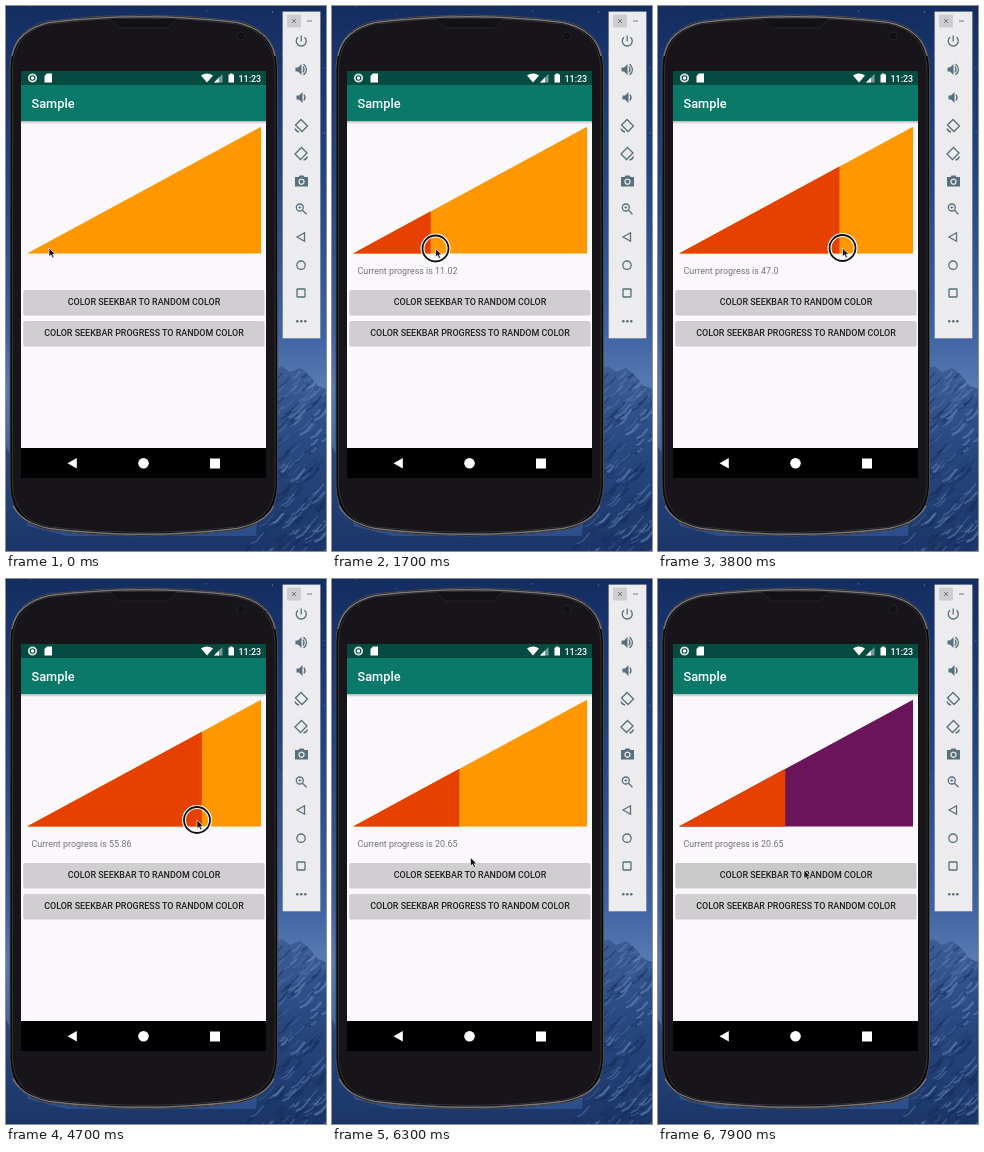
Recreate the animation shown at these times as an HTML page. Size 320x545 px, loop 8000 ms.

```html
<!DOCTYPE html>
<html lang="en">
<head>
<meta charset="utf-8">
<title>Triangle seekbar</title>
<style>
html, body { margin: 0; width: 100%; height: 100%; overflow: hidden; background: #14264e; }
svg { display: block; width: 320px; height: 545px; font-family: Roboto, sans-serif; font-size: 8.93px; }
.caps { font-weight: 500; text-anchor: middle; fill: #202020; }
.tools { fill: none; stroke: #596f7b; stroke-width: 1.3; }
.solid { fill: #596f7b; stroke: none; }
</style>
</head>
<body>
<svg viewBox="0 0 320 545">
  <defs>
    <linearGradient id="sky" x2="0" y2="1">
      <stop offset="0" stop-color="#142d61"/>
      <stop offset=".3" stop-color="#204481"/>
      <stop offset=".6" stop-color="#3e63a2"/>
      <stop offset=".7" stop-color="#587bb2"/>
      <stop offset="1" stop-color="#274987"/>
    </linearGradient>
    <linearGradient id="rock" x2="0" y2="1">
      <stop offset="0" stop-color="#3c5d96"/>
      <stop offset=".4" stop-color="#2a4a83"/>
      <stop offset="1" stop-color="#1b3567"/>
    </linearGradient>
    <linearGradient id="shade" x2="0" y2="1">
      <stop offset="0" stop-color="#000" stop-opacity=".28"/>
      <stop offset="1" stop-color="#000" stop-opacity="0"/>
    </linearGradient>
    <clipPath id="ridge">
      <path d="M0 440L6 452L22 520L60 530H250L262 366L276 360L284 366L294 362L304 370L312 380L320 383V545H0Z"/>
    </clipPath>
  </defs>

  <!-- Desktop -->
  <rect width="320" height="545" fill="url(#sky)"/>
  <g id="stars" fill="#a9c0e8"></g>
  <g clip-path="url(#ridge)">
    <rect y="360" width="320" height="185" fill="url(#rock)"/>
    <g id="streaks" fill="none" stroke-linecap="round"></g>
  </g>

  <!-- Phone -->
  <path d="M4 62Q5 23 42 15Q137 3 232 15Q270 23 271.500 62V480Q270 517 232 524Q137 536 42 524Q5 517 4 480Z" fill="#09090a" stroke="#4b4b50"/>
  <path d="M6.500 62Q8 26 43 18Q137 6 231 18Q267 26 269 62V480Q267 514 231 521Q137 532 43 521Q8 514 6.500 480Z" fill="#171519" stroke="#3c3b40" stroke-width=".8"/>
  <path d="M6 50Q11 24 43 16.500Q137 5 231 16.500Q264 24 269 50M7 500Q16 517 43 522.500Q137 534 231 522.500Q259 517 268 500" fill="none" stroke="#77767b" stroke-width="1.300"/>
  <path d="M104 13L113 22H162L171 13" fill="#121114" stroke="#29282c" stroke-width=".8"/>
  <circle cx="235" cy="30" r="4" fill="#111014" stroke="#222126"/>

  <!-- Screen -->
  <rect x="15" y="65" width="245" height="407" fill="#faf8fb"/>
  <rect x="15" y="65" width="245" height="14" fill="#064b42"/>
  <rect x="15" y="79" width="245" height="36" fill="#0a7969"/>
  <rect x="15" y="115" width="245" height="3" fill="url(#shade)"/>
  <rect x="15" y="442" width="245" height="30"/>
  <g fill="#fff">
    <circle cx="26.500" cy="72" r="3.700" fill="none" stroke="#d5e2df" stroke-width="1.800"/>
    <circle cx="26.500" cy="72" r="1.700"/>
    <path d="M38.500 70L41 67.500H46V76.500H38.500ZM195 69.500Q201 65.500 207 69.500L201 76.500ZM222.500 68.500H224V67.500H226.500V68.500H228V76.500H222.500Z"/>
    <path d="M208 76.500L216.500 68V76.500Z" opacity=".45"/>
    <path d="M208 76.500L213 71.500V76.500Z"/>
    <text x="232.500" y="75.500" font-weight="500">11:23</text>
    <text x="25.500" y="102.300" font-size="12.76" font-weight="500">Sample</text>
    <path d="M61.500 457.300L70.800 452V462.600Z"/>
    <circle cx="137.500" cy="457.300" r="5.300"/>
    <rect x="204" y="452.500" width="10" height="10"/>
  </g>

  <path id="track"/>
  <path id="fill" fill="#e64100"/>
  <text id="label" x="25.500" y="268" fill="#747275"></text>

  <g id="buttons"></g>
  <text class="caps" x="138" y="299.300">COLOR SEEKBAR TO RANDOM COLOR</text>
  <text class="caps" x="138" y="330">COLOR SEEKBAR PROGRESS TO RANDOM COLOR</text>

  <!-- Emulator toolbar -->
  <rect x="276.750" y="5.750" width="37.500" height="326.500" fill="#ececee" stroke="#8b93a3" stroke-width=".5"/>
  <rect x="281" y="8.500" width="14" height="13" rx="1" fill="#cdcdcf"/>
  <path d="M286 13L290 17M290 13L286 17M301 15H306" fill="none" stroke="#777b80"/>
  <g class="tools">
    <path d="M292 31.200A5 5 0 1 0 298.500 31.200M295.200 29.500V35.500"/>
    <path class="solid" d="M289.500 61.500H292L295.500 58V69L292 65.500H289.500ZM290.500 89.500H293L296.500 86V97L293 93.500H290.500Z"/>
    <path d="M297 60.500Q299 63.500 297 66.500M297.500 58Q303.500 63.500 297.500 69M298 88.500Q300 91.500 298 94.500"/>
    <g id="turn">
      <path d="M289.500 119L295 113.500L301.500 120L296 125.500ZM289 122.500Q290 125.500 293 126"/>
    </g>
    <use href="#turn" transform="matrix(-1 0 0 1 590.500 28)"/>
    <path class="solid" fill-rule="evenodd" d="M289 171H292.500L293.500 169.500H297.500L298.500 171H302V180.500H289ZM295.500 172.500A3.200 3.200 0 1 0 295.510 172.500Z"/>
    <circle class="solid" cx="295.500" cy="175.700" r="1.900"/>
    <circle cx="293.800" cy="201.500" r="3.500"/>
    <path d="M296.500 204.300L300.500 208.300"/>
    <path d="M292.200 201.500H295.400M293.800 199.900V203.100" stroke-width=".8"/>
    <path d="M291 231L298.500 226.800V235.200Z"/>
    <circle cx="295" cy="259.200" r="4.200"/>
    <rect x="291" y="283" width="8" height="8" rx=".5"/>
    <g class="solid">
      <circle cx="291.300" cy="315.200" r="1.300"/>
      <circle cx="295.300" cy="315.200" r="1.300"/>
      <circle cx="299.300" cy="315.200" r="1.300"/>
    </g>
  </g>

  <g id="pointer">
    <g id="ring" fill="none">
      <circle r="13" stroke="#fff" stroke-width="4"/>
      <circle r="13" stroke="#111" stroke-width="1.800"/>
    </g>
    <path d="M0 0V8.500L2 6.800L3.500 10L5 9.300L3.600 6.300H6.200Z" fill="#111" stroke="#fff" stroke-width=".6"/>
  </g>
</svg>
<script>
const LOOP = 8000, STEP = 100;
const LEFT = 21, WIDTH = 234, BASE = 247.4, HEIGHT = 126.6;
const PRESS = 7200, RELEASE = 7500;
const $ = id => document.getElementById(id);

// Rows of time, x, y
const pointerPath = [
  [0, 43, 242], [300, 43, 242], [1000, 72, 242], [1700, 103.5, 242.5], [3000, 154.5, 244.5],
  [3800, 184.5, 242], [4300, 200, 241.5], [4700, 191, 241], [5300, 152, 243],
  [5700, 128, 245], [5900, 128, 247], [6300, 138.5, 278.5], [6700, 146, 291], [8000, 146, 291]
];
// Rows of time and share of the width; progress is the share of the area
const sharePath = [
  [400, .9], [1700, 11.02], [3000, 31.06], [3800, 47], [4400, 58.2],
  [4700, 55.86], [5300, 33.5], [5700, 20.65], [8000, 20.65]
].map(([t, progress]) => [t, Math.sqrt(progress / 100)]);

function sample(path, t) {
  const i = path.findIndex(key => key[0] > t);
  if (i < 1) return path[i < 0 ? path.length - 1 : 0].slice(1);
  const a = path[i - 1], b = path[i], k = (t - a[0]) / (b[0] - a[0]);
  return a.slice(1).map((v, n) => v + (b[n + 1] - v) * k);
}

const within = (t, from, to) => t >= from && t < to;

const wedge = share =>
  `M${LEFT} ${BASE}L${LEFT + WIDTH * share} ${BASE - HEIGHT * share}V${BASE}Z`;

function formatNumber(v) {
  const s = String(Math.round(v * 100) / 100);
  return s.includes('.') ? s : s + '.0';
}

function draw(now) {
  const t = Math.floor(now % LOOP / STEP) * STEP;
  const [x, y] = sample(pointerPath, t);
  const pressed = within(t, PRESS, RELEASE);
  $('pointer').setAttribute('transform', `translate(${x} ${y})`);
  $('ring').style.display = pressed || within(t, 300, 5900) ? '' : 'none';

  const share = t < 400 ? 0 : sample(sharePath, t)[0];
  $('fill').setAttribute('d', wedge(share));
  $('label').textContent = share ? 'Current progress is ' + formatNumber(share * share * 100) : '';
  $('track').setAttribute('fill', t < RELEASE ? '#ff9800' : '#6a1459');
  $('face0').setAttribute('fill', pressed ? '#c2c0c2' : t >= RELEASE ? '#cac9ca' : '#d0ced0');
  requestAnimationFrame(draw);
}

$('track').setAttribute('d', wedge(1));
$('buttons').innerHTML = [284, 315].map((y, i) =>
  `<rect x="17.5" y="${y + 1}" width="241" height="24.5" rx="1.5" opacity=".18"/>
   <rect id="face${i}" x="17.5" y="${y}" width="240.5" height="24" rx="1.5" fill="#d0ced0"/>`).join('');

let seed = 7;
const random = () => (seed = seed * 16807 % 2147483647) / 2147483647;
const repeat = (count, make) => Array.from({ length: count }, make).join('');

$('stars').innerHTML = repeat(180, () =>
  `<circle cx="${random() * 320}" cy="${random() * 300}" r="${.25 + random() * .45}" opacity="${.2 + random() * .6}"/>`);

// Slanted light and dark strokes give the rock its grain
$('streaks').innerHTML = repeat(240, (_, i) => {
  const x = 245 + random() * 80, y = 365 + random() * 180, size = 4 + random() * 12;
  return `<path d="M${x} ${y}l${-size * .5} ${size * .6}l${-size * .4} ${size * .2}"
    stroke="${i % 2 ? '#6c8dc0' : '#122750'}" stroke-width="${.6 + random() * 2}" opacity="${.2 + random() * .35}"/>`;
});

requestAnimationFrame(draw);
</script>
</body>
</html>
```
